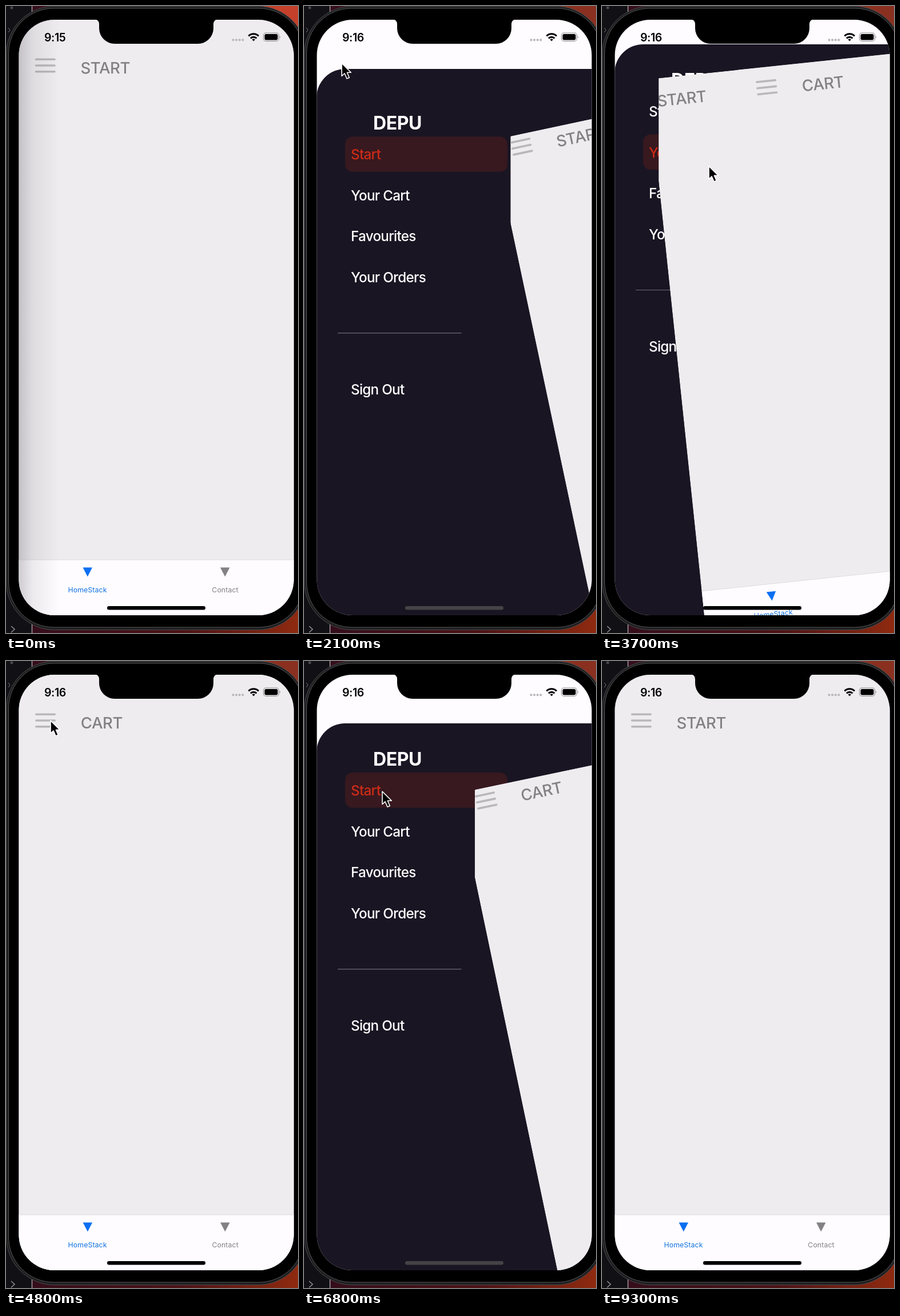
Animation of 511x1096 px, one loop 9.9 s. Source, as an HTML page:

```html
<!DOCTYPE html>
<html lang="en">
<head>
<meta charset="utf-8">
<title>Drawer navigation</title>
<style>
  html, body { margin: 0; width: 100%; height: 100%; overflow: hidden; background: #000; }
  svg { display: block; width: 100vw; height: 100vh; }
  text { font-family: Inter, "Open Sans", sans-serif; }
  .title { font-size: 27.5px; font-weight: 500; letter-spacing: -.4px; fill: #828184; }
  .brand { font-size: 32px; font-weight: 700; letter-spacing: -.4px; fill: #fff; }
  .item { font-size: 24.2px; font-weight: 500; letter-spacing: -.7px; fill: #fff; }
  .tab { font-size: 12.3px; letter-spacing: .1px; text-anchor: middle; }
  .clock { font-size: 19.5px; font-weight: 600; letter-spacing: -.4px; }
</style>
</head>
<body>
<svg viewBox="0 0 511 1096" preserveAspectRatio="none">
  <defs>
    <clipPath id="screenClip"><rect x="22.5" y="24" width="481" height="1041" rx="62"/></clipPath>
    <clipPath id="sceneClip"><rect x="22" y="-200" width="700" height="1800"/></clipPath>
    <clipPath id="cardClip"><rect x="22" y="24" width="640" height="1500"/></clipPath>
    <linearGradient id="edgeShade">
      <stop offset="0" stop-color="#77757c" stop-opacity=".36"/>
      <stop offset=".35" stop-color="#77757c" stop-opacity=".13"/>
      <stop offset="1" stop-color="#77757c" stop-opacity="0"/>
    </linearGradient>
    <linearGradient id="floor">
      <stop offset="0" stop-color="#310d1c"/>
      <stop offset=".6" stop-color="#4c1215"/>
      <stop offset="1" stop-color="#8e2a10"/>
    </linearGradient>
    <g id="burger" stroke="#b8b7ba" stroke-width="3.6" stroke-linecap="round">
      <path d="M52.5 93.2H85M52.5 104H85M52.5 114.8H85"/>
    </g>
  </defs>

  <!-- desktop -->
  <rect width="511" height="1096" fill="url(#floor)"/>
  <rect id="wall" x="380" width="131" height="548"/>
  <rect width="45" height="1096" fill="#111014"/>
  <path d="M45.5 0V1096" stroke="#a9a5a8" stroke-width="1.4"/>
  <circle cx="10" cy="3" r="2.5" fill="#48474a"/>
  <path d="M4 38l3 4-3 4" fill="none" stroke="#77767a"/>
  <!-- phone body -->
  <rect x=".5" y=".5" width="525" height="1090" rx="84" fill="#1d1d1f" stroke="#4c4c4e"/>
  <rect x="4.5" y="4" width="517" height="1082" rx="79" stroke="#58585a"/>
  <path d="M9 1084l6 5.5-6 5.5" fill="none" stroke="#8d8c90" stroke-width="1.6"/>

  <g clip-path="url(#screenClip)">
    <rect x="22" y="24" width="482" height="1042" fill="#fefcff"/>
    <path id="drawer" d="M22 1300V74a50 50 0 0 1 50-50H504V1300Z" fill="#1a1523"/>
    <g id="menu">
      <rect id="active" x="72" width="284" height="61.5" rx="13" fill="#37191f"/>
      <text class="brand" x="121" y="11.5">DEPU</text>
      <path d="M59 367.5H275.500" stroke="#6c6973" stroke-width="1.2"/>
      <text class="item" x="82" y="475">Sign Out</text>
    </g>
    <g id="scene" clip-path="url(#sceneClip)">
      <g id="tilt">
        <g clip-path="url(#cardClip)">
          <rect x="22" y="24" width="640" height="1500" fill="#eeecef"/>
          <g id="content">
            <g id="startPage">
              <use href="#burger"/>
              <text class="title" x="130.500" y="118">START</text>
            </g>
            <g id="cartPage">
              <rect x="22" y="24" width="640" height="1100" fill="#eeecef"/>
              <use href="#burger"/>
              <text class="title" x="130.500" y="118">CART</text>
            </g>
            <rect x="22" y="968" width="640" height="600" fill="#fefcff"/>
            <path d="M22 968H662" stroke="#dddbde"/>
            <path d="M134.500 981.500h16.500l-8.250 16z" fill="#0a6ff2"/>
            <path d="M375 981.500h16.500l-8.250 16z" fill="#828184"/>
            <text class="tab" x="142.500" y="1025.300" fill="#1173e0">HomeStack</text>
            <text class="tab" x="383.500" y="1025.300" fill="#828184">Contact</text>
          </g>
        </g>
      </g>
    </g>
    <rect id="shade" x="22" y="24" width="72" height="1041" fill="url(#edgeShade)"/>
    <rect id="home" x="177" y="1049" width="172" height="6.500" rx="3.250"/>
  </g>

  <!-- notch and status bar -->
  <path d="M155 23.500q8 0 8 9V39a27 27 0 0 0 27 27H336a27 27 0 0 0 27-27V32.500q0-9 8-9z"/>
  <text id="clock" class="clock" x="67" y="61.500"></text>
  <path d="M397.500 59.300h18" stroke="#b9b7ba" stroke-width="4.200" stroke-linecap="round" stroke-dasharray="0 5.600"/>
  <g fill="none" stroke="#000" stroke-width="3">
    <path d="M424.500 52.500a12.300 12.300 0 0 1 17.500 0M428 56.500a7.300 7.300 0 0 1 10.500 0"/>
    <path d="M433.250 61.500l-2.700-3q2.700-2 5.400 0z" fill="#000" stroke="none"/>
  </g>
  <rect x="450.500" y="47" width="27" height="14.500" rx="4.500" fill="none" stroke="#8d8b8f" stroke-width="1.100"/>
  <rect x="452.500" y="49" width="23" height="10.500" rx="2.700"/>
  <path d="M479.200 52v4.500q2-2.200 0-4.500" fill="#8d8b8f"/>

  <path id="cursor" d="M0 0V22.500L5 17.800L9 27L13.300 25.200L9.400 16.300H16.300Z"
        stroke="#fff" stroke-width="1.600" stroke-linejoin="round"/>
</svg>

<script>
const LOOP = 9900, STEP = 100;
const SPRING = 6;          // decay per second
const TILT_TIME = 500;
const CUT = 600;           // clock changes here
const TO_CART = 3450, TO_START = 6763, PAGE_DELAY = 65;
const MOVES = [
  { at: -9999, open: false },
  { at: 1437, open: true },
  { at: TO_CART, open: false },
  { at: 4850, open: true },
  { at: TO_START, open: false },
];
const POINTER = [ // time, x, y
  [700, 515, 560], [1350, 66, 100], [2500, 66, 100], [3200, 187, 280],
  [4200, 187, 280], [4700, 78, 104], [5500, 78, 106], [5900, 78, 106],
  [6550, 137, 228], [7800, 137, 228], [8200, 515, 620],
];
const ITEMS = ['Start', 'Your Cart', 'Favourites', 'Your Orders'];
const ITEM_GAP = 71.5;

const $ = id => document.getElementById(id);
const set = (id, name, value) => $(id).setAttribute(name, value);
const move = (id, x, y) => set(id, 'transform', `translate(${x} ${y})`);
const decay = ms => Math.exp(-SPRING * Math.max(0, ms) / 1000);
const easeInOut = u => u < .5 ? 2 * u * u : 1 - 2 * (1 - u) ** 2;

const labels = ITEMS.map((name, i) => {
  const label = document.createElementNS('http://www.w3.org/2000/svg', 'text');
  label.setAttribute('class', 'item');
  label.setAttribute('x', 82);
  label.setAttribute('y', 64 + i * ITEM_GAP);
  label.textContent = name;
  return $('menu').appendChild(label);
});

function drawDrawer(t) {
  const { at, open } = MOVES.findLast(m => m.at <= t);
  const age = t - at;
  const slide = open ? 1 - decay(age) : decay(age);
  const eased = easeInOut(Math.min(1, age / TILT_TIME));
  const turn = open ? eased : 1 - eased;
  const drop = 86 * turn;
  // the top inset collapses as the card leaves the status bar
  const inset = open ? Math.min(58, drop) : 58 * turn ** .38;
  const menuY = open && age < 1000 ? 144 + .7 * drop : 86 + drop;

  move('drawer', 0, drop);
  move('menu', 0, menuY);
  move('scene', 346 * slide, drop);
  set('tilt', 'transform', `rotate(${-12 * turn} 597 234)`);
  move('content', 0, -inset);
  set('home', 'fill', slide > .5 ? '#444346' : '#000');
}

function drawPages(t) {
  let cart = 0;
  if (t >= TO_START) cart = decay(t - TO_START - PAGE_DELAY);
  else if (t >= TO_CART) cart = 1 - decay(t - TO_CART - PAGE_DELAY);
  move('startPage', -144 * cart, 0);
  move('cartPage', 481 * (1 - cart), 0);
}

function drawItems(t) {
  const active = t >= TO_CART && t < TO_START ? 1 : 0;
  const target = active ? 0 : 1;
  const release = active ? TO_START : TO_CART;
  const pressed = t >= release - 150 && t < release;
  set('active', 'y', 24 + active * ITEM_GAP);
  labels.forEach((label, i) => {
    label.style.fill = i === active ? '#cc2b17' : '#fff';
    label.style.opacity = pressed && i === target ? .3 : 1;
  });
}

function drawPointer(t) {
  const next = POINTER.findIndex(p => p[0] > t);
  set('cursor', 'visibility', next > 0 ? 'visible' : 'hidden');
  if (next < 1) return;
  const [t0, x0, y0] = POINTER[next - 1], [t1, x1, y1] = POINTER[next];
  const u = easeInOut((t - t0) / (t1 - t0));
  move('cursor', x0 + (x1 - x0) * u, y0 + (y1 - y0) * u);
}

function draw(now) {
  const t = Math.floor((now % LOOP) / STEP) * STEP;
  const early = t < CUT;
  $('clock').textContent = early ? '9:15' : '9:16';
  set('shade', 'visibility', early ? 'visible' : 'hidden');
  set('wall', 'fill', early ? '#c5402a' : '#8a3020');
  drawDrawer(t);
  drawPages(t);
  drawItems(t);
  drawPointer(t);
}

const begin = performance.now();
function tick() {
  draw(performance.now() - begin);
  requestAnimationFrame(tick);
}
tick();
</script>
</body>
</html>
```
